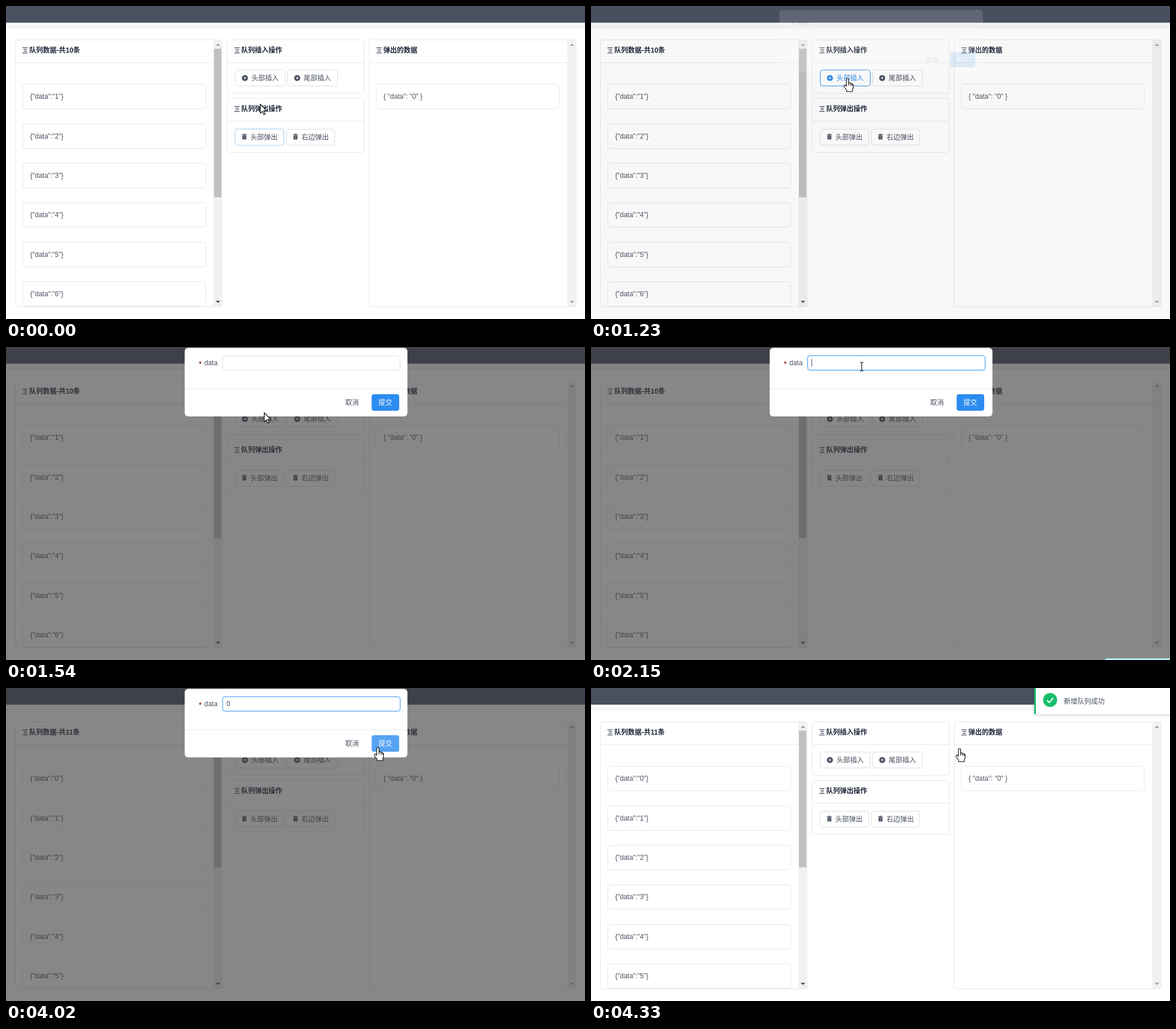
Animation of 1019 by 550 pixels, one loop 6.33 s. Source, as an HTML page with a canvas:

```html
<!DOCTYPE html>
<html lang="zh-CN">
<head>
<meta charset="utf-8">
<style>
html, body { margin: 0; width: 100%; height: 100%; overflow: hidden; background: #fff; }
canvas { display: block; }
</style>
</head>
<body>
<canvas id="stage" width="1019" height="550"></canvas>
<script>
const W = 1019, H = 550, LOOP = 6330, STEP = 77.7;
const INK = '#495060', TITLE = '#1c2438', BORDER = '#dddee1', LINE = '#e6e7ea';
const BLUE = '#2d8cf0', GREEN = '#19be6b';
const FONT = '12px "Liberation Sans", "Noto Sans CJK SC", "Noto Sans CJK", sans-serif';

const stage = document.getElementById('stage').getContext('2d');
const layer = Object.assign(document.createElement('canvas'), { width: W, height: H }).getContext('2d');
let c = stage;

const clamp = v => Math.max(0, Math.min(1, v));
const smooth = v => v * v * (3 - 2 * v);
const progress = (t, start, length = 300) => clamp((t - start) / length);

function rect(x, y, w, h, fill) {
  c.fillStyle = fill;
  c.fillRect(x, y, w, h);
}

function box(x, y, w, h, r, fill, stroke, width = 1) {
  c.beginPath();
  c.roundRect(x + .5, y + .5, w - 1, h - 1, r);
  if (fill) { c.fillStyle = fill; c.fill(); }
  if (stroke) { c.strokeStyle = stroke; c.lineWidth = width; c.stroke(); }
}

function panel(x, y, w, h, r, fill) {
  c.beginPath();
  c.roundRect(x, y, w, h, r);
  c.fillStyle = fill;
  c.fill();
}

function text(s, x, y, color = INK, weight = '') {
  c.font = weight + ' ' + FONT;
  c.fillStyle = color;
  c.fillText(s, x, y);
}

function disc(x, y, r, color) {
  c.fillStyle = color;
  c.beginPath();
  c.arc(x, y, r, 0, 7);
  c.fill();
}

function poly(points, fill, stroke, width) {
  c.beginPath();
  points.forEach(([x, y]) => c.lineTo(x, y));
  if (fill) { c.fillStyle = fill; c.fill(); }
  if (stroke) { c.strokeStyle = stroke; c.lineWidth = width; c.stroke(); }
}

function card(x, y, w, h, title, headWidth = w) {
  box(x, y, w, h, 4, '#fff', LINE);
  rect(x + 1, y + 40, headWidth - 2, 1, LINE);
  rect(x + 13, y + 14, 9, 1, TITLE);
  rect(x + 15, y + 17, 6, 1, TITLE);
  rect(x + 15, y + 20, 6, 1, TITLE);
  rect(x + 13, y + 23, 9, 1, TITLE);
  text(title, x + 25, y + 23, TITLE, 'bold');
}

function scrollbar(x, thumbBottom) {
  rect(x, 60, 16, 468, '#f1f1f1');
  const m = x + 8;
  poly([[m - 4, 70], [m, 66], [m + 4, 70]], '#a3a3a3');
  poly([[m - 4, 518], [m, 522], [m + 4, 518]], thumbBottom ? '#505050' : '#a3a3a3');
  if (thumbBottom) rect(x + 1, 75, 13, thumbBottom - 75, '#c1c1c1');
}

function item(x, row, label) {
  const y = Math.floor(137.6 + 69.4 * row);
  box(x, y, 323, 44, 4, '#fff', LINE);
  text(label, x + 13.5, y + 26);
}

function button(x, y, w, icon, label, hover, focus) {
  const color = hover ? BLUE : INK;
  if (focus) box(x - 1, y - 1, w + 2, 31, 5, null, 'rgba(45,140,240,.14)', 2);
  box(x, y, w, 29, 4, '#fff', hover ? BLUE : focus ? '#c3d9ea' : BORDER);
  if (icon === 'plus') {
    disc(x + 17.5, y + 14.5, 5.3, color);
    rect(x + 15, y + 14, 5, 1, '#fff');
    rect(x + 17, y + 12, 1, 5, '#fff');
  } else {
    rect(x + 12.5, y + 9.5, 8, 1.5, color);
    rect(x + 15, y + 8.5, 3, 1, color);
    panel(x + 13, y + 11.5, 7, 7, 1, color);
    rect(x + 15, y + 13, 1, 4, '#8d929d');
    rect(x + 17, y + 13, 1, 4, '#8d929d');
  }
  text(label, x + (icon === 'plus' ? 29 : 27), y + 18.5, color);
}

function page(t, mouse) {
  const added = t > 4010;
  rect(0, 0, W, H, '#fff');
  rect(0, 29, W, 8, '#f8f8f9');
  rect(0, 37, W, 1, '#ededef');
  rect(0, 38, W, 1, '#f4f4f5');
  rect(0, 0, W, 29.3, INK);

  card(16, 59, 365, 470, `队列数据-共${added ? 11 : 10}条`, 350);
  scrollbar(365, added ? 315 : 336);
  c.save();
  c.beginPath();
  c.rect(17, 100, 348, 428);
  c.clip();
  for (let i = 0; i < 6; i++) item(29, i, `{"data":"${added ? i : i + 1}"}`);
  c.restore();

  card(389, 59, 242, 95, '队列插入操作');
  button(403, 112, 89, 'plus', '头部插入', t > 640 && t < 1440 && mouse.y < 141);
  button(495, 112, 89, 'plus', '尾部插入');
  card(389, 162, 242, 96, '队列弹出操作');
  button(403, 216, 86, 'trash', '头部弹出', false, t < 1140);
  button(493, 216, 86, 'trash', '右边弹出');

  card(639, 59, 365, 470, '弹出的数据', 350);
  scrollbar(988);
  item(651, 0, '{ "data": "0" }');
}

function dialog(t) {
  const focus = progress(t, 2010, 120);
  panel(314.5, 1.5, 392, 120.5, 6, '#fff');
  rect(315, 73, 391, 1, '#e9eaec');
  text('*', 339.5, 34, '#9c2a1c', 'bold');
  text('data', 349, 32);
  if (focus) box(380, 14, 315, 28, 5, null, `rgba(45,140,240,${.2 * focus})`, 2);
  box(381, 15, 313, 26, 4, '#fff', focus ? '#57a3f3' : BORDER);

  const typed = t > 2690;
  if (typed) text('0', 388, 32);
  const caret = typed ? t < 3190 || (t > 3700 && t < 4010) : t > 2070 && t < 2450;
  if (caret) rect(typed ? 395 : 388, 21, 1, 13, INK);

  text('取消', 597, 102);
  panel(643.5, 83, 48.5, 29, 4, t > 3350 ? '#57a3f3' : BLUE);
  text('提交', 655.5, 102, '#fff');
}

function notice() {
  c.shadowColor = 'rgba(0,0,0,.2)';
  c.shadowBlur = 6;
  c.shadowOffsetY = 1;
  rect(780, -6, 335, 52, '#fff');
  c.shadowColor = 'transparent';
  rect(780, 0, 3, 46, GREEN);
  disc(808, 21, 12.3, GREEN);
  poly([[802.5, 21.5], [806.5, 25.5], [813.5, 17.5]], null, '#fff', 2);
  text('新增队列成功', 832, 28);
}

// Draws a group on its own canvas, then blends it as one picture.
function group(draw, alpha, place) {
  c = layer;
  c.clearRect(0, 0, W, H);
  draw();
  c = stage;
  c.save();
  c.globalAlpha = alpha;
  place();
  c.drawImage(layer.canvas, 0, 0);
  c.restore();
}

const HAND = new Path2D('M-2 2Q-2 0 0 0Q2 0 2 2V8Q5 6.500 5.500 9Q8 7.800 8.300 10Q10 9.500 10 12V16L8.500 20V23H-1.500V20.500L-6 14.500Q-6.500 11 -4 11.500L-2 13.500Z');
const ARROW = new Path2D('M0 0V16L3.700 12.600L6.200 18.400L8.600 17.400L6.200 11.700H11.200Z');
const IBEAM = new Path2D('M-3 -7.500H-1L0 -6.500L1 -7.500H3M0 -6.500V6.500M-3 7.500H-1L0 6.500L1 7.500H3');
const KNUCKLES = new Path2D('M2 8V12M5.500 9V12.500M8.300 10V13');

const TRACK = [
  [0, 447, 172], [640, 447, 172], [1080, 451, 127], [1400, 451, 127], [2000, 476, 34],
  [2940, 476, 34], [3300, 651, 104], [3560, 654, 104], [4180, 654, 104], [4330, 648, 106], [LOOP, 648, 106]
];

function mouseAt(t) {
  const i = Math.max(1, TRACK.findIndex(k => k[0] >= t));
  const [t0, x0, y0] = TRACK[i - 1], [t1, x1, y1] = TRACK[i];
  const p = smooth((t - t0) / (t1 - t0));
  return { x: x0 + (x1 - x0) * p, y: y0 + (y1 - y0) * p };
}

function cursor(t, { x, y }) {
  const overInput = t > 1400 && t < 3300 && y < 41;
  const overButton = t > 640 && t < 1440 && y < 141;
  const overSubmit = t > 2940 && x > 643 && y > 83;
  c.save();
  c.translate(Math.round(x) + .5, Math.round(y) + .5);
  c.strokeStyle = '#111';
  c.fillStyle = '#fff';
  c.lineWidth = 1.2;
  c.lineJoin = 'round';
  if (overInput) {
    c.stroke(IBEAM);
  } else if (overButton || overSubmit) {
    c.fill(HAND);
    c.stroke(HAND);
    c.stroke(KNUCKLES);
  } else {
    c.fill(ARROW);
    c.stroke(ARROW);
  }
  c.restore();
}

function render(now) {
  const raw = now % LOOP;
  const t = raw < 670 ? 0 : Math.min(LOOP, 680 + Math.floor((raw - 670) / STEP) * STEP);
  const mouse = mouseAt(t);
  page(t, mouse);

  const mask = t < 3000 ? progress(t, 1206) : 1 - progress(t, 4025);
  if (mask > 0) rect(0, 0, W, H, `rgba(55,55,55,${.6 * mask})`);
  if (t > 1700 && t < 4010) panel(904, 547, 130, 20, 4, '#b0e8f0');

  const open = t < 3000 ? 1 - (1 - progress(t, 1203)) ** 2 : (1 - progress(t, 4025)) ** 2;
  if (open > 0) group(() => dialog(t), open, () => {
    const scale = .9 + .1 * open;
    c.translate(510.5, 61.5);
    c.scale(scale, scale);
    c.translate(-510.5, -61.5);
  });

  const slide = smooth(progress(t, 3990));
  if (slide > 0) group(notice, slide, () => c.translate(Math.round(335 * (1 - slide)), 0));
  cursor(t, mouse);
}

const begin = performance.now();
function loop() {
  render(performance.now() - begin);
  requestAnimationFrame(loop);
}
loop();
</script>
</body>
</html>
```
